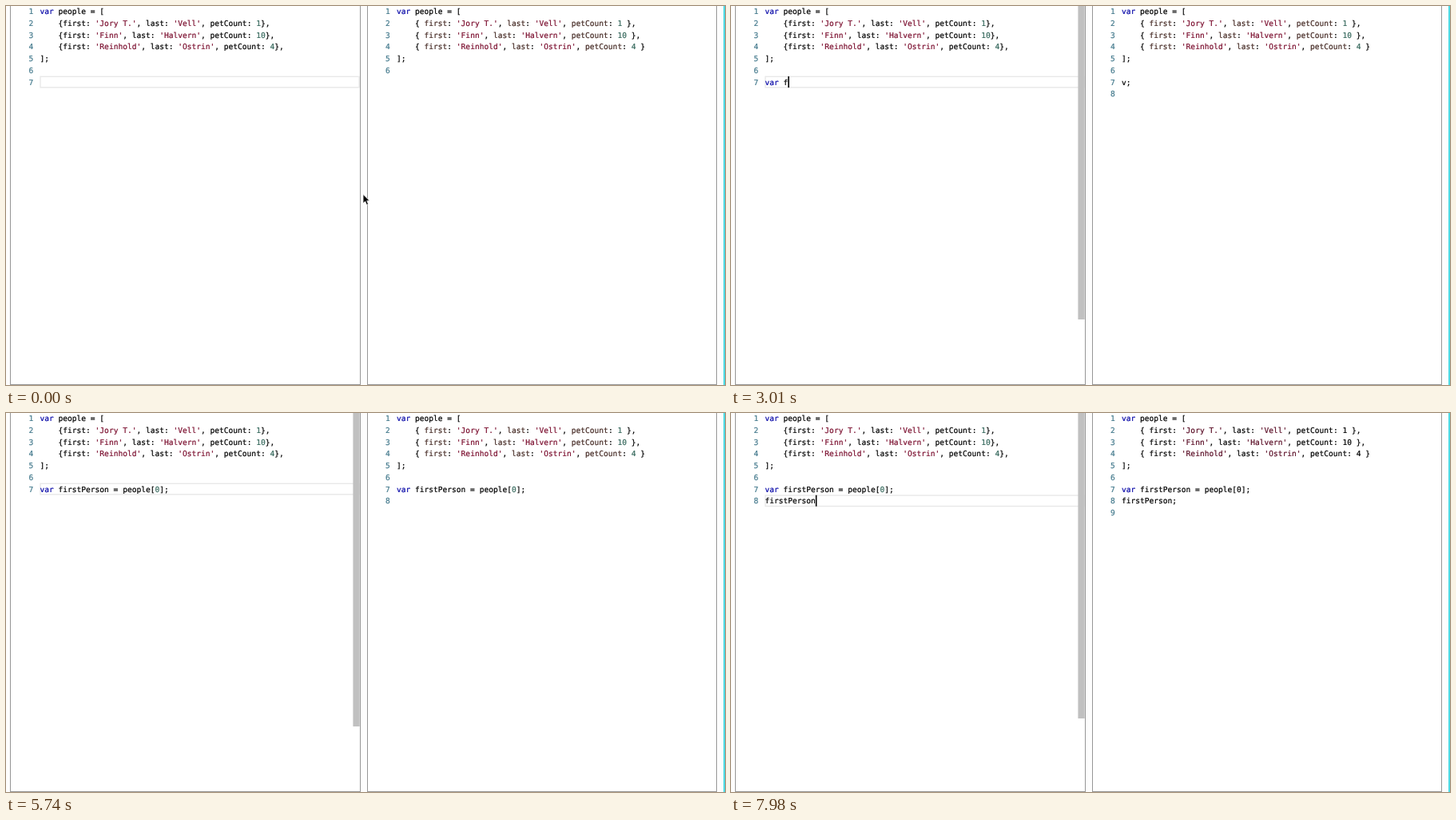
Animation of 900x474 px, one loop 8000 ms. Source, as an HTML page:

```html
<!DOCTYPE html>
<html lang="en">
<head>
<meta charset="utf-8">
<title>Live code editor</title>
<style>
  html, body { margin: 0; width: 100%; height: 100%; overflow: hidden; background: #fff; }
  svg { display: block; }
  text {
    font: 9.57px "DejaVu Sans Mono", monospace;
    white-space: pre;
    text-rendering: geometricPrecision;
    color: #000;
  }
  text, tspan { fill: currentColor; stroke: currentColor; stroke-width: .2; }
  .num { color: #43798c; }
  .key { color: #0808a8; }
  .str { color: #7c1030; }
  .lit { color: #35685c; }
  #output .prop { color: #452a24; }
  #output.fresh .prop, #output.fresh .lit { color: #000; }
  #output.fresh .str { color: #5c1028; }
  .pane { fill: #fff; stroke: #969696; }
</style>
</head>
<body>
<svg width="900" height="474" viewBox="0 0 900 474">
  <rect width="900" height="474" fill="#fdfdfd"/>
  <rect class="pane" x="5.5" y="-2.5" width="438" height="476"/>
  <rect class="pane" x="452.5" y="-2.5" width="437" height="476"/>
  <rect x="898" width="2" height="474" fill="#4fdce6"/>
  <rect id="active" x="43" width="399" height="13.5" fill="none" stroke="#e8e8e8" stroke-width="1.4"/>
  <rect id="thumb" x="434.4" y="0" width="8.2" fill="#c0c0c0"/>
  <g id="input"></g>
  <g id="output"></g>
  <rect id="caret" width="1.6" height="14" fill="#000"/>
  <path id="mouse" d="M0 0V11.3L2.6 8.9L4.5 13.2L6.5 12.3L4.7 8.2H8.2Z" fill="#000" stroke="#fff" stroke-width=".8"/>
</svg>
<script>
const LOOP = 8000, ROW = 14.75, CHAR = 5.761, LEFT = 42.5, RIGHT = 489;
const START = 2520, KEY = 84, BUILD = 440, BLINK = 700, CLICK = 1190;
const $ = id => document.getElementById(id);
const [input, output, active, thumb, caret, mouse] =
  ['input', 'output', 'active', 'thumb', 'caret', 'mouse'].map($);
const clamp = v => Math.min(1, Math.max(0, v));

const people = [['Jory T.', 'Vell', 1], ['Finn', 'Halvern', 10], ['Reinhold', 'Ostrin', 4]];
const record = ([first, last, pets], pad) =>
  `    {${pad}first: '${first}', last: '${last}', petCount: ${pets}${pad}}`;
const listing = rows => ['var people = [', ...rows, '];', ''];
const source = listing(people.map(p => record(p, '') + ','));
const result = listing(people.map((p, i) => record(p, ' ') + (i < 2 ? ',' : '')));

// Steady typing, with a rest before each later part.
const parts = [['var firstPerson = people', 0], ['[0];', 300], ['\n', 1180],
               ['first', 200], ['Person', 200]];
const typed = parts.map(p => p[0]).join('');
const keyTimes = [];
let clock = START;
for (const [part, rest] of parts) {
  clock += rest;
  for (const _ of part) keyTimes.push(clock += KEY);
}
const typedAt = t => typed.slice(0, keyTimes.filter(k => k <= t).length);

const paint = line => line.replace(/('[^']*')|\b(var)\b|\b(\d+)\b|(\w+)(?=:)/g,
  (s, str, key, lit) =>
    `<tspan class="${str ? 'str' : key ? 'key' : lit ? 'lit' : 'prop'}">${s}</tspan>`);

function show(group, lines, x) {
  const key = lines.join('\n');
  if (group.shown === key) return;
  group.shown = key;
  group.innerHTML = lines.map((line, i) => {
    const y = 10 + i * ROW;
    return `<text class="num" x="${x - 14}" y="${y}">${i + 1}</text>` +
           `<text x="${x}" y="${y}">${paint(line)}</text>`;
  }).join('');
}

// The right pane recompiles at a fixed interval and is recoloured shortly after.
function showOutput(t) {
  const built = Math.floor((t - 10) / BUILD) * BUILD + 10;
  const code = typedAt(built).replace(/\s*=\s*$/, '');
  const lines = code.split('\n').filter(Boolean).map(s => s.replace(/;?$/, ';'));
  show(output, [...result, ...lines, ...(code ? [''] : [])], RIGHT);
  const changed = typedAt(built) !== typedAt(built - BUILD);
  output.classList.toggle('fresh', changed && t - built < 140);
}

function caretOpacity(t) {
  if (t < CLICK) return 0;
  const idle = t - Math.max(CLICK, ...keyTimes.filter(k => k <= t));
  return idle < BLINK / 4 ? 1 : clamp(.5 + .8 * Math.sin(2 * Math.PI * idle / BLINK));
}

function moveMouse(t) {
  const p = clamp((t - 350) / 700);
  const e = p * p * (3 - 2 * p);
  mouse.setAttribute('transform', `translate(${447 - 352 * e} ${235.5 - 141.5 * e})`);
  mouse.style.display = t < keyTimes[0] ? '' : 'none';
}

function render(t) {
  const lines = typedAt(t).split('\n');
  show(input, [...source, ...lines], LEFT);
  showOutput(t);

  const row = lines.length - 1;
  const top = 88.3 + row * ROW;
  active.setAttribute('y', top);
  caret.setAttribute('x', LEFT + lines[row].length * CHAR);
  caret.setAttribute('y', top - .3);
  caret.setAttribute('opacity', caretOpacity(t));
  thumb.setAttribute('height', t < 420 ? 0 : 392 - 10 * row);
  moveMouse(t);
}

function tick() {
  render(performance.now() % LOOP);
  requestAnimationFrame(tick);
}
tick();
</script>
</body>
</html>
```
